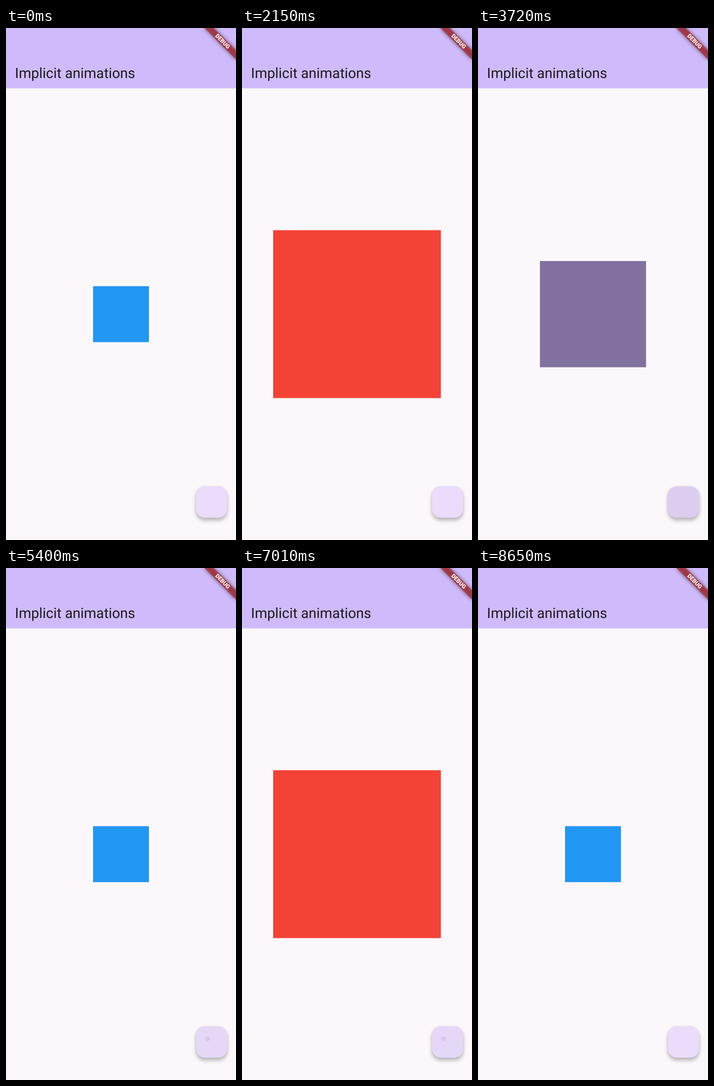
Animation of 502x1116 px, one loop 8.85 s. Source, as an HTML page:

```html
<!DOCTYPE html>
<html lang="en">
<head>
<meta charset="utf-8">
<title>Implicit animations</title>
<style>
  html, body { margin: 0; width: 100%; height: 100%; overflow: hidden; background: #fcf7fb; }
  svg { display: block; width: 100%; height: 100%; }
  text { font-family: Roboto, Arial, sans-serif; text-rendering: geometricPrecision; }
</style>
</head>
<body>
<svg viewBox="0 0 502 1116">
  <defs>
    <filter id="bannerBlur" x="-30%" y="-150%" width="160%" height="400%"><feGaussianBlur stdDeviation="4.84"/></filter>
    <filter id="spotBlur" x="-40%" y="-40%" width="180%" height="180%"><feGaussianBlur stdDeviation="4.2"/></filter>
    <filter id="ambientBlur" x="-40%" y="-40%" width="180%" height="180%"><feGaussianBlur stdDeviation="2"/></filter>
    <filter id="edgeBlur" color-interpolation-filters="sRGB"><feGaussianBlur stdDeviation=".35"/></filter>
    <radialGradient id="soft">
      <stop offset=".75" stop-color="#21005d"/>
      <stop offset="1" stop-color="#21005d" stop-opacity="0"/>
    </radialGradient>
    <rect id="fab" x="414.4" y="999" width="68.4" height="68.4" rx="19.5"/>
    <clipPath id="fabClip"><use href="#fab"/></clipPath>
  </defs>

  <rect width="502" height="1116" fill="#fcf7fb"/>
  <rect width="502" height="131.6" fill="#cfbbfc"/>
  <text x="19.5" y="108.7" font-size="30.87" fill="#1d1b20">Implicit animations</text>

  <rect id="box" filter="url(#edgeBlur)"/>

  <use href="#fab" y="6" opacity=".26" filter="url(#spotBlur)"/>
  <use href="#fab" opacity=".08" filter="url(#ambientBlur)"/>
  <use href="#fab" fill="#eadcfa"/>
  <g clip-path="url(#fabClip)">
    <use id="highlight" href="#fab" fill="#21005d"/>
    <circle id="ripple" fill="url(#soft)"/>
  </g>

  <g transform="translate(502 0) rotate(45)">
    <rect x="-48.8" y="34.2" width="97.6" height="14.64" opacity=".5" filter="url(#bannerBlur)"/>
    <rect x="-48.8" y="34.2" width="97.6" height="14.64" fill="#b71c1c" fill-opacity=".627"/>
    <text y="45.2" font-size="12.4" font-weight="900" text-anchor="middle" fill="#fff">DEBUG</text>
  </g>
</svg>
<script>
const LOOP = 8850, STEP = 100 / 3, TAP_LENGTH = 600, RESIZE = 300;
const BLUE = [33, 150, 243], RED = [244, 67, 54];
// Each tap toggles the box after a short delay.
const TAPS = [
  { at: 1540, delay: 175 },
  { at: 3390, delay: 168 },
  { at: 5400, delay: 185 },
  { at: 7010, delay: 188 }
];

const byId = id => document.getElementById(id);
const box = byId('box'), highlight = byId('highlight'), ripple = byId('ripple');
const clamp = v => Math.min(1, Math.max(0, v));
const mix = (a, b, p) => a + (b - a) * p;
const ramp = (t, from, to) => clamp((t - from) / (to - from));

function set(el, attrs) {
  for (const name in attrs) el.setAttribute(name, attrs[name]);
}

function drawBox(p) {
  const size = mix(122, 366, p);
  const rgb = BLUE.map((c, i) => Math.round(mix(c, RED[i], p)));
  set(box, {
    x: 251 - size / 2, y: 623.7 - size / 2,
    width: size, height: size, fill: `rgb(${rgb})`
  });
}

function drawInk(t) {
  const active = t >= 0 && t < TAP_LENGTH;
  const grow = ramp(t, 0, 230);
  set(highlight, {
    opacity: active ? mix(.02, .05, ramp(t, 0, 120)) * (1 - ramp(t, 180, 380)) : 0
  });
  set(ripple, {
    cx: mix(440, 448.5, grow), cy: mix(1026, 1033, grow), r: mix(6, 75, grow),
    opacity: active ? .07 * (1 - ramp(t, 250, TAP_LENGTH)) : 0
  });
}

function draw(time) {
  let red = 0, ink = -1;
  TAPS.forEach((tap, i) => {
    if (time < tap.at) return;
    const t = Math.floor((time - tap.at + 8) / STEP) * STEP;
    const p = clamp((t - tap.delay) / RESIZE);
    red = i % 2 ? 1 - p : p;
    ink = t;
  });
  drawBox(red);
  drawInk(ink);
}

function tick() {
  draw(performance.now() % LOOP);
  requestAnimationFrame(tick);
}
tick();
</script>
</body>
</html>
```
